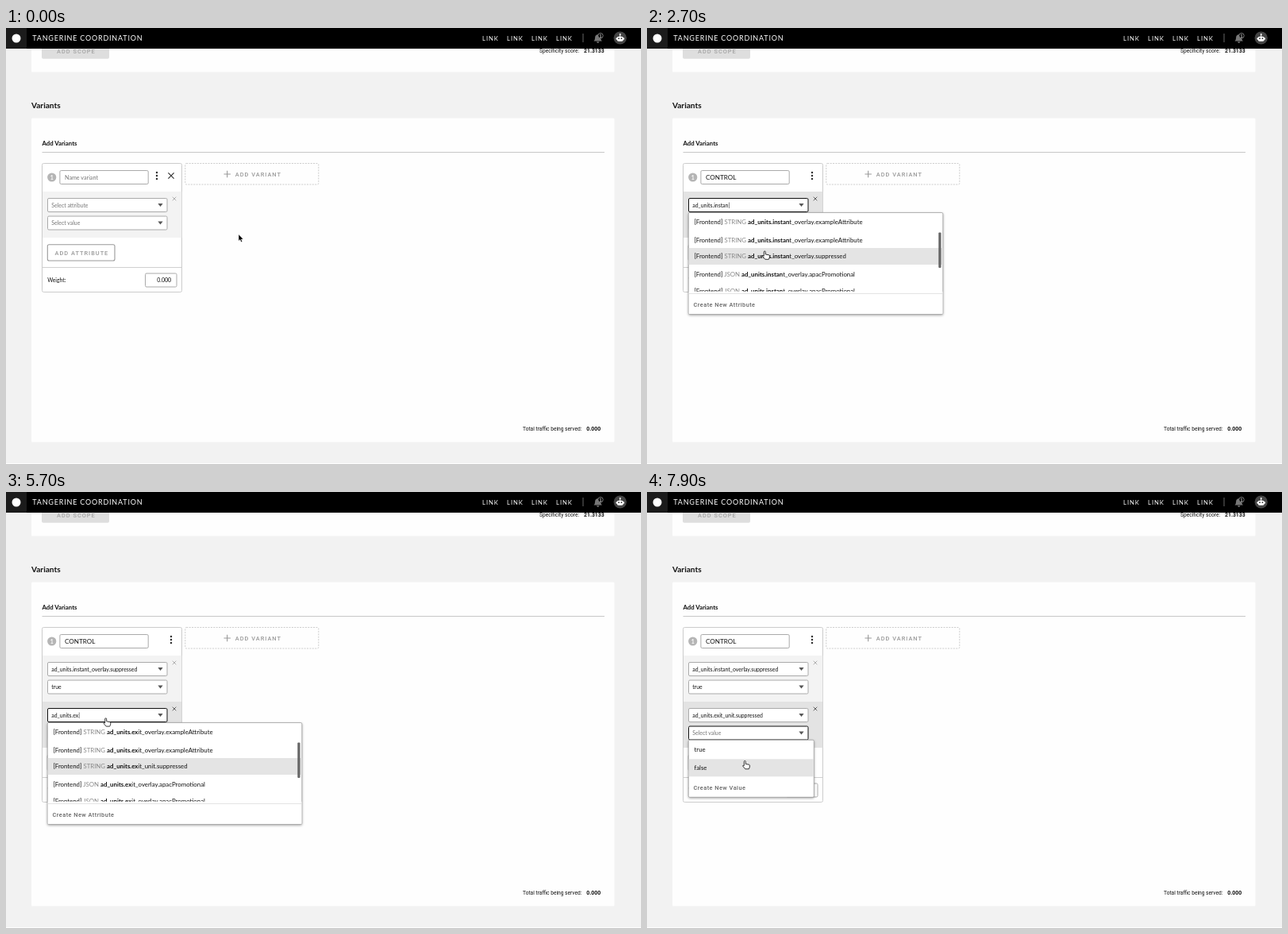
Recreate the animation shown at these times as an HTML page. Size 800x549 px, loop 8000 ms.

```html
<!DOCTYPE html>
<html lang="en">
<head>
<meta charset="utf-8">
<title>Variants</title>
<style>
  html, body { margin: 0; width: 100%; height: 100%; overflow: hidden; background: #f2f2f2; }
  svg { display: block; width: 100vw; height: 100vh; }
  text { font-family: Lato, sans-serif; font-size: 6.9px; fill: #111; }
  .rob { font-family: Roboto, sans-serif; font-size: 6.65px; }
  .btn { font-family: Roboto, sans-serif; font-size: 7.4px; font-weight: 500; letter-spacing: 1px; fill: #999; }
  .new { font-family: Roboto, sans-serif; font-size: 7.4px; font-weight: 500; letter-spacing: .44px; fill: #666; }
  .link { font-size: 7.7px; letter-spacing: .95px; fill: #fff; }
  .item { font-size: 7.83px; }
  .hint { fill: #777; }
  .dim { fill: #888; }
  .b { font-weight: 700; }
  .menu { filter: drop-shadow(0 1.5px 1.5px rgba(0, 0, 0, .35)); }
</style>
</head>
<body>
<svg viewBox="0 0 800 549" preserveAspectRatio="none">
  <g id="page"></g>
  <g id="card"></g>
  <g id="head"></g>
  <path id="hand" fill="#fff" stroke="#222" stroke-width=".9" stroke-linejoin="round"
    d="M-1 6V1.2a1 1 0 0 1 2 0V4.2l4 .7q1.3 .3 1.2 1.6l-.4 2.2-.8 1.8H.5L-2.8 6.6q.3-1.2 1.8-.2z"/>
  <path id="arrow" stroke="#fff" stroke-width=".5" d="M0 0V8.4L1.9 6.7 3.2 9.8 4.7 9.2 3.4 6.2H6z"/>
</svg>
<script>
const LOOP = 8000, STEP = 100;
const $ = id => document.getElementById(id);

const text = (x, y, s, cls = '', more = '') => `<text x="${x}" y="${y}" class="${cls}" ${more}>${s}</text>`;
const rect = (x, y, w, h, fill, more = '') => `<rect x="${x}" y="${y}" width="${w}" height="${h}" fill="${fill}" ${more}/>`;
const line = (d, color, w = 1) => `<path d="${d}" fill="none" stroke="${color}" stroke-width="${w}"/>`;
const dot = (x, y, r, fill, more = '') => `<circle cx="${x}" cy="${y}" r="${r}" fill="${fill}" ${more}/>`;
const box = (x, y, w, h, color = '#aaa') => rect(x, y, w, h, '#fff', `rx="1.5" stroke="${color}"`);
const cross = (x, y, r, color, w) => line(`M${x - r} ${y - r}l${2 * r} ${2 * r}M${x + r} ${y - r}l${-2 * r} ${2 * r}`, color, w);

function page() {
  return rect(0, 0, 800, 549, '#f2f2f2') + rect(0, 548, 800, 1, '#fff') +
    rect(32, 20, 734.5, 35.5, '#fefefe', 'rx="1.5"') +
    rect(32, 113.5, 734.5, 408, '#fefefe', 'rx="1.5"') +
    rect(45, 18, 85, 20.8, '#dedede', 'rx="2"') +
    text(64, 32, 'ADD SCOPE', 'btn', 'style="fill:#a5a5a5"') +
    text(672, 31.4, 'Specificity score:', 'rob') +
    text(728, 31.4, '21.3133', 'rob b', 'style="font-size:6.9px"') +
    text(32, 101, 'Variants', 'b', 'style="font-size:10.1px"') +
    text(45.4, 148.3, 'Add Variants', 'b', 'style="font-size:7.8px"') +
    line('M45.5 156.5H754', '#c8c8c8') +
    rect(225.8, 170.5, 168, 26.5, 'none', 'rx="1.5" stroke="#ccc" stroke-dasharray="2 1.4"') +
    line('M274.5 184h8.4M278.7 179.8v8.4', '#999', 1.1) +
    text(288.8, 186.6, 'ADD VARIANT', 'btn') +
    text(651, 507.4, 'Total traffic being served:', 'rob') +
    text(731.3, 507.4, '0.000', 'rob b', 'style="font-size:6.9px"');
}

function head() {
  const links = [600, 631, 662, 693].map(x => text(x, 15.7, 'LINK', 'link')).join('');
  const bell = '<path fill="#777" d="M740.5 16.5q1.6-1.4 1.6-4.3 0-3.6 3.6-3.9 3.6.3 3.6 3.9 0 2.9 1.6 4.3zM744 17.3h3.4q-.4 1.6-1.7 1.6t-1.7-1.6z"/>' +
    dot(749, 9.7, 3.2, '#000', 'stroke="#999" stroke-width=".8"') +
    text(749, 11.5, '1', 'b', 'text-anchor="middle" style="font-size:5px;fill:#ccc"');
  const bot = dot(773.7, 12.5, 8.1, '#444') +
    rect(769.7, 10.7, 8, 6, '#fff', 'rx="2"') + rect(768.4, 12.2, 10.6, 2.6, '#fff', 'rx="1"') +
    line('M773.7 11V8.2', '#fff') + dot(773.7, 8, 1, '#fff') +
    dot(772, 13.2, .9, '#333') + dot(775.4, 13.2, .9, '#333');
  return rect(0, 0, 800, 26, '#000') + rect(0, 0, 26, 26, '#1b1b1b') + dot(13, 13, 5.5, '#fff') +
    text(33.3, 16.2, 'TANGERINE COORDINATION', '', 'style="font-size:9px;letter-spacing:.8px;fill:#fff"') +
    links + line('M727 7v11', '#666') + bell + bot;
}

function select(y, value, hint, focus) {
  return box(52.5, y, 150.5, 17, focus ? '#111' : '#aaa') +
    text(57.3, y + 11, value || hint, value ? '' : 'hint') +
    `<path fill="#555" d="M191.4 ${y + 6.5}h6.2l-3.1 4z"/>`;
}

function group(y, g) {
  return rect(46, y, 175.3, 58, g.active ? '#e3e3e3' : '#f3f3f3') +
    cross(212, y + 9, 2.3, g.active ? '#555' : '#aaa', .9) +
    select(y + 8.5, g.attr, 'Select attribute', g.list) +
    select(y + 31, g.value, 'Select value', g.pick);
}

const frame = (y, w, h) => rect(52.3, y, w, h, '#fff', 'rx="1.5" class="menu" stroke="#999" stroke-width=".7"');

// Attribute list below a select; y is its top edge.
function attrList(y, match, rest, third) {
  const row = (dy, type, tail) => text(59.4, y + dy,
    `[Frontend] <tspan class="dim">${type}</tspan> <tspan class="b">${match}</tspan>${tail}`, 'item');
  const example = rest + '_overlay.exampleAttribute', promo = rest + '_overlay.apacPromotional';
  return frame(y, 320.5, 128) + rect(52.7, y + 44.5, 319.7, 21, '#e4e4e4') +
    row(14.7, 'STRING', example) + row(37.2, 'STRING', example) +
    row(57.9, 'STRING', third) + row(80.5, 'JSON', promo) + row(101.8, 'JSON', promo) +
    rect(52.7, y + 99.3, 319.7, 28.2, '#fff') + line(`M52.7 ${y + 102}H372.4`, '#ddd', .8) +
    rect(367.3, y + 25, 3.2, 44.5, '#666', 'rx="1"') +
    text(58.6, y + 118.1, 'Create New Attribute', 'new');
}

function valueList(y, hot) {
  return frame(y, 158, 72) + rect(52.7, y + 1 + hot * 23, 157.2, 22, '#e4e4e4') +
    text(59.5, y + 14.7, 'true', 'item') + text(59.5, y + 37.8, 'false', 'item') +
    text(58.6, y + 62.2, 'Create New Value', 'new');
}

function card(t) {
  const named = t >= 1600, two = t >= 5200, shift = two ? 58 : 0;
  const first = {
    active: named && t < 5700,
    list: named && t < 2800,
    pick: t >= 3700 && t < 4300,
    attr: !named ? '' : t < 2800 ? 'ad_units.instan|' : 'ad_units.instant_overlay.suppressed',
    value: t < 4300 ? '' : 'true'
  };
  const second = {
    active: t >= 5700,
    list: t >= 5700 && t < 6800,
    pick: t >= 7500,
    attr: t < 5700 ? '' : t < 6800 ? 'ad_units.ex|' : 'ad_units.exit_unit.suppressed',
    value: ''
  };
  const dotsX = named ? 208 : 190;
  return rect(45.5, 170.5, 176, 162 + shift, '#fff', 'rx="2" stroke="#ccc"') +
    dot(57.7, 188, 5.6, '#b5b5b5') + text(57.7, 190.6, '1', 'b', 'text-anchor="middle" style="fill:#fff"') +
    box(67.9, 179.5, 111.3, 17) +
    (named ? text(74, 191.3, 'CONTROL', '', 'style="font-size:8.1px"')
           : text(74, 190.5, 'Name variant', 'hint', 'style="font-size:7.2px"')) +
    [182, 186, 190].map(y => dot(dotsX, y, 1.25, '#333')).join('') +
    (named ? '' : cross(208, 186, 3.6, '#333', 1.2)) +
    group(206, first) + (two ? group(264, second) : '') +
    `<g transform="translate(0 ${shift})">` +
      rect(52.3, 272.8, 84.7, 20.2, '#fff', 'rx="2" stroke="#999" stroke-width="1.1"') +
      text(61.5, 285.6, 'ADD ATTRIBUTE', 'btn') +
      line('M46 301.5H221', '#d0d0d0') +
      text(52.2, 320, 'Weight:', '', 'style="font-size:6.75px"') +
      box(175.5, 309, 39.5, 17) +
      text(208.2, 320.2, '0.000', '', 'text-anchor="end" style="font-size:7.05px"') +
    '</g>' +
    (first.list ? attrList(232.5, 'ad_units.instan', 't', 't_overlay.suppressed') : '') +
    (first.pick ? valueList(254.3, 0) : '') +
    (second.list ? attrList(290.5, 'ad_units.ex', 'it', 'it_unit.suppressed') : '') +
    (second.pick ? valueList(312.3, 1) : '');
}

// Pointer moves: start, end, x, y
const moves = [
  [100, 800, 169, 189], [1000, 1100, 169, 197], [1100, 1400, 162.5, 227.5],
  [2000, 2700, 148.3, 280.8], [2900, 3500, 151, 248.3], [3700, 4100, 148, 264],
  [4600, 5000, 125.7, 284.6], [5900, 6400, 125.5, 347.3],
  [6700, 7300, 125, 301], [7500, 7900, 123.3, 338.3]
];
const ease = k => k * k * (3 - 2 * k);

function pointer(t) {
  let x = 293, y = 259.8;
  for (const [a, b, nx, ny] of moves) {
    if (t <= a) break;
    const k = ease(Math.min(1, (t - a) / (b - a)));
    x += (nx - x) * k;
    y += (ny - y) * k;
  }
  return [x, y];
}

function place(t) {
  const [x, y] = pointer(t);
  const plain = x > 222 || (t >= 6600 && t < 6800);
  for (const id of ['hand', 'arrow']) {
    $(id).setAttribute('transform', `translate(${x.toFixed(2)} ${y.toFixed(2)})`);
    $(id).setAttribute('visibility', (id === 'arrow') === plain ? 'visible' : 'hidden');
  }
}

$('page').innerHTML = page();
$('head').innerHTML = head();
const began = performance.now();
let shown = -1;

function draw() {
  const t = Math.floor((performance.now() - began) % LOOP / STEP) * STEP;
  if (t !== shown) {
    shown = t;
    $('card').innerHTML = card(t);
    place(t);
  }
  requestAnimationFrame(draw);
}
draw();
</script>
</body>
</html>
```
